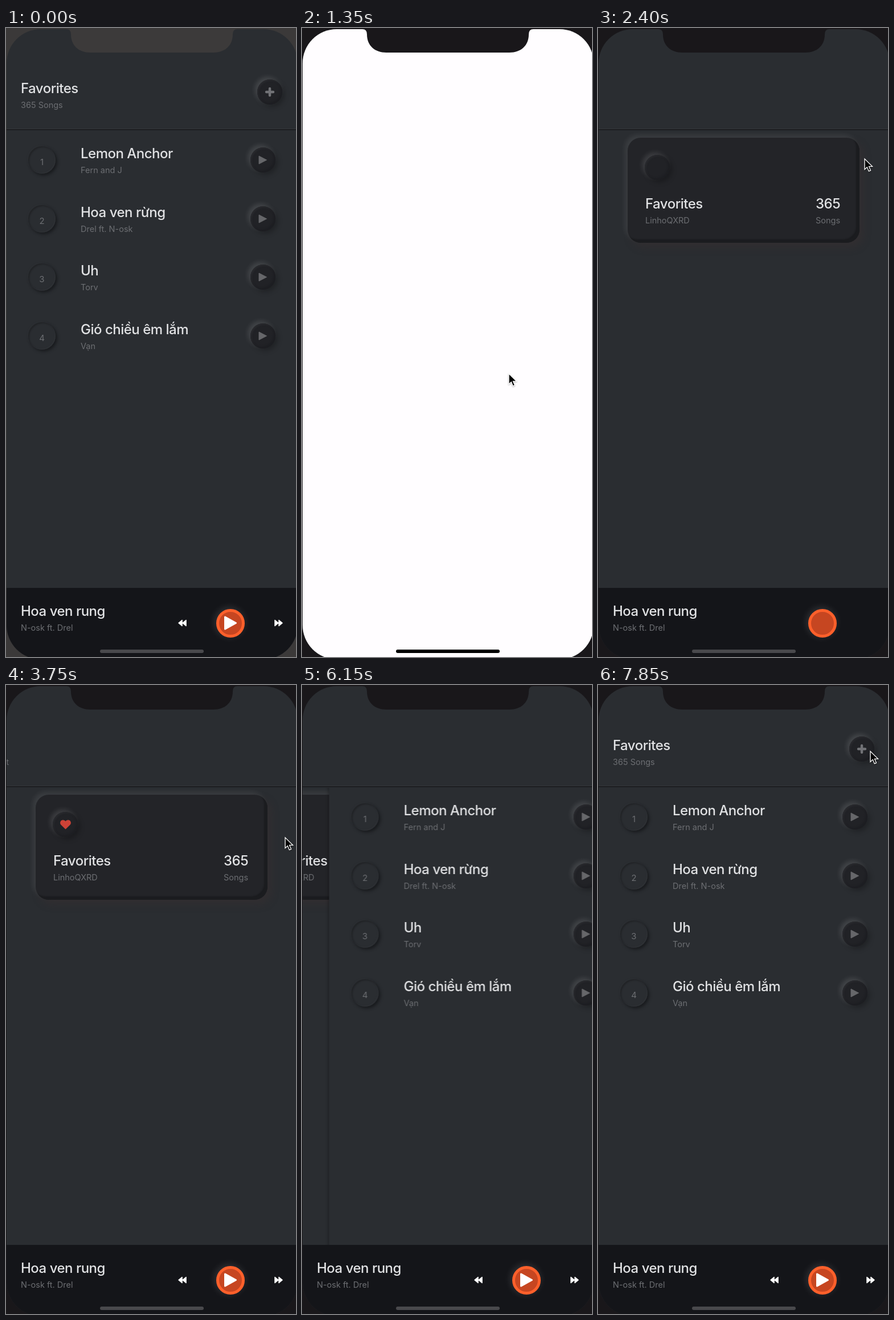
These frames come from a looping animation (509x1101 px, 8 s). An HTML page:

```html
<!DOCTYPE html>
<html lang="en">
<head>
<meta charset="utf-8">
<title>Music player</title>
<style>
  :root { --bg: #2a2d31; --loop: 8s linear infinite; --hold: 8s step-end infinite; }
  html, body { margin: 0; width: 100%; height: 100%; overflow: hidden; }
  body { position: relative; font-family: Inter, Roboto, sans-serif; background: #19171a; animation: bezel var(--loop); }
  div, svg, span { position: absolute; }
  .full { left: 0; top: 0; width: 509px; height: 1101px; }
  .screen { clip-path: inset(2px -3px -4px 1px round 60px); background: var(--bg); }

  /* Text boxes are centred on the middle of the capitals */
  .t { font-size: 24px; font-weight: 500; letter-spacing: -.5px; color: #e1e2e4; }
  .s { font-size: 14.5px; color: #6c6e72; }
  .t, .s { white-space: nowrap; line-height: 40px; margin-top: -20px; }

  .round { width: 44px; height: 44px; margin: -22px; border-radius: 50%; background: #212226;
    box-shadow: inset -3px -3px 3px #1d1e22, inset 2px 2px 3px #292a2e,
      -4px -4px 8px rgba(255,255,255,.13), 4px 4px 8px rgba(0,0,0,.25); }
  .num { width: 48px; height: 48px; margin: -24px; border-radius: 50%; background: var(--bg);
    font-size: 15px; line-height: 55px; text-align: center; color: #6c6e72;
    box-shadow: inset 2px 2px 2px #222427, inset -1px -1px 2px #303337,
      3px 3px 5px #191b1e, -1px -1px 2px #2f3236; }
  .ico { overflow: visible; stroke-linejoin: round; }

  .body { left: 0; top: 180px; width: 509px; height: 800px; overflow: hidden; }
  .page { left: 0; top: -180px; width: 509px; height: 1101px; background: var(--bg); }
  .cards { animation: under var(--loop); }
  .list { box-shadow: -2px 0 5px rgba(0,0,0,.25); animation: push var(--loop); }
  .card { left: 52px; top: 192px; width: 407px; height: 184px; border-radius: 23px; background: #232428;
    box-shadow: inset -6px -6px 2px #1b1c1f, -5px -5px 8px rgba(255,255,255,.08), 7px 8px 14px rgba(62,48,50,.35);
    animation: card var(--loop); }
  .line { left: 0; top: 176px; width: 509px; height: 1px; background: #34363a; border-bottom: 2px solid #1c1d20; }

  .fav { animation: favX var(--loop), favOn var(--hold); }
  .pl { animation: plX var(--loop), plOn var(--hold); }
  .plus { animation: plusX var(--loop), plusOn var(--hold); }
  .late { animation: late var(--hold); }

  .player { left: 0; top: 980px; width: 509px; height: 125px; background: #141519; }
  .go { left: 369px; top: 1017px; width: 40px; height: 40px; border: 5px solid #ff602b; border-radius: 50%;
    background: #c64621; box-shadow: -2px -2px 14px rgba(255,255,255,.15); }

  .blank { background: #fffdff; animation: blank var(--hold); }
  .load { left: 0; top: 0; width: 509px; height: 24px; background: #045004; animation: load var(--hold); }
  .load span { top: -4px; line-height: 20px; font-size: 15px; color: #e9f3e9; white-space: nowrap; }
  .home { left: 165px; top: 1088px; width: 182px; height: 6px; border-radius: 3px; background: #49494c; animation: home var(--hold); }
  .notch { fill: #19171a; animation: notch var(--loop); }
  .cursor { left: 0; top: 0; overflow: visible; filter: drop-shadow(0 1px 1px rgba(0,0,0,.3));
    animation: move var(--loop), seen var(--hold); }

  @keyframes bezel { 0% { background: #3b3939 } 6.25%, 100% { background: #19171a } }
  @keyframes notch { 0% { fill: #3c3a3a } 6.25%, 100% { fill: #19171a } }
  @keyframes blank { 0%, 28.7%, 100% { opacity: 0 } 16.8% { opacity: 1 } }
  @keyframes load { 0%, 28.7%, 100% { opacity: 0 } 20.6% { opacity: 1 } }
  @keyframes home { 0%, 28.7%, 100% { background: #49494c } 16.8% { background: #000 } }
  @keyframes late { 0%, 35.55%, 100% { opacity: 1 } 16.8% { opacity: 0 } }

  @keyframes push {
    0%, 16.8% { transform: none }
    16.81%, 74.375% { transform: translateX(520px) }
    75% { transform: translateX(312px) }
    75.625% { transform: translateX(168px) }
    76.25% { transform: translateX(90px) }
    76.875% { transform: translateX(48px) }
    77.5% { transform: translateX(26px) }
    78.75% { transform: translateX(7px) }
    82.5%, 100% { transform: none }
  }
  @keyframes under {
    0%, 74.375% { transform: none }
    75% { transform: translateX(-59px) }
    75.625% { transform: translateX(-102px) }
    76.25% { transform: translateX(-126px) }
    76.875% { transform: translateX(-139px) }
    78.75%, 100% { transform: translateX(-153px) }
  }
  @keyframes card {
    0%, 62% { transform: none; animation-timing-function: ease-out }
    65% { transform: translateX(455px) }
    65.3% { transform: translateX(480px); animation-timing-function: ease-out }
    67.5%, 100% { transform: none }
  }
  @keyframes favX {
    0%, 16.8% { transform: none }
    16.81%, 85.625% { transform: translateX(-148px); animation-timing-function: ease-in-out }
    91.25%, 100% { transform: none }
  }
  @keyframes favOn { 0%, 86.2%, 100% { opacity: 1 } 16.8% { opacity: 0 } }
  @keyframes plX {
    0%, 46.25% { transform: translateX(-148px); animation-timing-function: ease-in-out }
    51.875%, 100% { transform: none }
  }
  @keyframes plOn { 0%, 65.6%, 100% { opacity: 0 } 46.8% { opacity: 1 } }
  @keyframes plusX {
    0%, 16.8% { transform: none }
    16.81%, 46.25% { transform: translateX(148px); animation-timing-function: ease-in-out }
    51.875%, 65.6% { transform: none }
    65.61%, 85.625% { transform: translateX(148px); animation-timing-function: ease-in-out }
    91.25%, 100% { transform: none }
  }
  @keyframes plusOn { 0%, 46.8%, 86.2%, 100% { opacity: 1 } 16.8%, 65.6% { opacity: 0 } }

  @keyframes seen { 0%, 74.8% { opacity: 0 } 10.6%, 96.8%, 100% { opacity: 1 } }
  @keyframes move {
    0%, 10.6% { transform: translate(403px, 1043px) }
    11.9% { transform: translate(343px, 780px) }
    13.1%, 20.6% { transform: translate(363px, 605px) }
    27.5% { transform: translate(437px, 294px) }
    30%, 31.6% { transform: translate(468px, 229px) }
    33.1% { transform: translate(514px, 199px) }
    35.4% { transform: translate(514px, 245px) }
    38.1%, 49.4% { transform: translate(490px, 267px) }
    53.1% { transform: translate(400px, 325px) }
    56.9%, 57.2% { transform: translate(335px, 316px) }
    58.1%, 65.3% { transform: translate(324px, 308px) }
    67.5%, 71.3% { transform: translate(486px, 406px) }
    73.1%, 74.8% { transform: translate(415px, 277px) }
    74.81%, 100% { transform: translate(478px, 116px) }
  }
</style>
</head>
<body>
<div class="full screen">
  <div class="body">
    <div class="page cards">
      <div class="card">
        <div class="round" style="left:52px;top:52px"></div>
        <svg class="ico late" style="left:43px;top:44px" width="19" height="17" viewBox="0 0 19 17">
          <path fill="#ce4237" d="M9.5 16.5 1.5 8.8C-.8 6.4 0 2.700 2.300 1 4.700-.5 7.500.2 9.500 2.600 11.500.2 14.300-.5 16.700 1 19 2.700 19.800 6.400 17.500 8.800Z"/>
        </svg>
        <span class="t" style="left:31px;top:116px">Favorites</span>
        <span class="s" style="left:31px;top:145px">LinhoQXRD</span>
        <span class="t" style="left:330px;top:116px">365</span>
        <span class="s" style="left:330px;top:145px">Songs</span>
      </div>
    </div>
    <div class="page list" id="list"></div>
  </div>

  <div class="line"></div>
  <div class="fav">
    <span class="t" style="left:26px;top:106px">Favorites</span>
    <span class="s" style="left:26px;top:135px">365 Songs</span>
  </div>
  <div class="pl">
    <span class="t" style="left:26px;top:106px">Playlists</span>
    <span class="s" style="left:26px;top:135px">16 created playlist</span>
  </div>
  <div class="plus">
    <div class="round" style="left:463px;top:112px"></div>
    <svg class="ico" style="left:455px;top:104px" width="16" height="16">
      <path d="M8 2V14M2 8H14" stroke="#717276" stroke-width="4.4" stroke-linecap="round"/>
    </svg>
  </div>

  <div class="player"></div>
  <span class="t" style="left:26px;top:1021px">Hoa ven rung</span>
  <span class="s" style="left:26px;top:1050px">N-osk ft. Drel</span>
  <div class="go"></div>
  <svg class="ico full late" fill="#fff" stroke="#fff">
    <path stroke-width="3" d="M384.500 1031V1052L403.500 1041.500Z"/>
    <path id="skip" stroke-width="1.600" d="M472 1036.500V1046.500L478 1041.500ZM479 1036.500V1046.500L485 1041.500Z"/>
    <use href="#skip" transform="matrix(-1 0 0 1 788 0)"/>
  </svg>

  <div class="full blank"></div>
  <div class="load">
    <span style="left:69px">Downloading bundle</span>
    <span style="right:68px">(658/658)...</span>
  </div>
  <div class="home"></div>
</div>

<svg class="full">
  <path class="notch" d="M106 0V2Q114 2 114 11C114 31 128 43 148 43H364C384 43 398 31 398 11Q398 2 406 2V0Z"/>
</svg>
<svg class="cursor" width="16" height="24">
  <path d="M0 0V18.500L4.300 14.600 7.300 21.700 10.500 20.300 7.500 13.400H13.500Z" stroke="#fff" stroke-width="1.300"/>
</svg>

<script>
  const songs = [
    ["Lemon Anchor", "Fern and J"],
    ["Hoa ven rừng", "Drel ft. N-osk"],
    ["Uh", "Torv"],
    ["Gió chiều êm lắm", "Vạn"]
  ];
  const row = ([title, artist], i) => `
    <div style="left:0;top:${231 + i * 102.6}px">
      <div class="num" style="left:63px;top:0">${i + 1}</div>
      <span class="t" style="left:131px;top:-11px">${title}</span>
      <span class="s" style="left:131px;top:18px">${artist}</span>
      <div class="round" style="left:451px;top:0"></div>
      <svg class="ico" style="left:443px;top:-8px" width="16" height="16">
        <path d="M1 1V15L14.500 8Z" fill="#66676a" stroke="#66676a"/>
      </svg>
    </div>`;
  document.getElementById("list").innerHTML = songs.map(row).join("");
</script>
</body>
</html>
```
